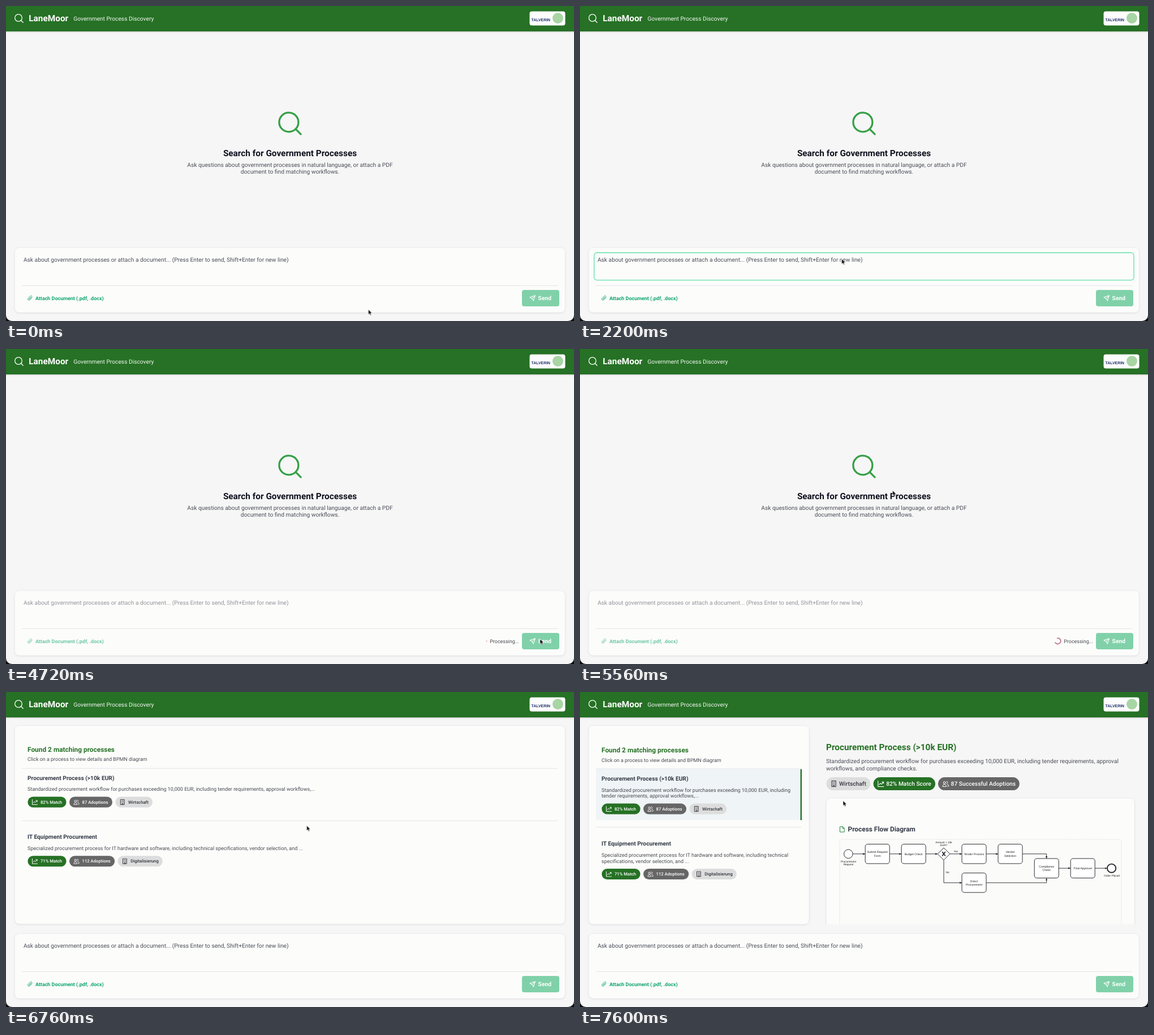
Animation, 1004 px wide and 558 px high, one loop 8000 ms. Source, as an HTML page:

```html
<!DOCTYPE html>
<html lang="en">
<head>
<meta charset="utf-8">
<title>Government Process Discovery</title>
<style>
  html, body { margin: 0; width: 100%; height: 100%; overflow: hidden; background: #f6f6f6; }
  svg.stage { display: block; width: 100vw; height: 100vh; }
  text { font-family: Roboto, "Open Sans", sans-serif; text-rendering: geometricPrecision; white-space: pre; }
  .h1 { font-size: 15.36px; font-weight: 700; }
  .h2 { font-size: 11.9px; font-weight: 700; }
  .h3 { font-size: 10.24px; font-weight: 700; fill: #343a46; }
  .body { font-size: 10.24px; fill: #4b4e58; }
  .small { font-size: 8.96px; fill: #484b52; }
  .desc { font-size: 9.02px; fill: #484b52; }
  .tag { font-size: 7.68px; font-weight: 500; }
  .tag.big { font-size: 10.24px; }
  .mid { text-anchor: middle; }
  .line { fill: none; stroke: currentColor; stroke-linecap: round; stroke-linejoin: round; }
  .card { fill: #fcfcfb; stroke: #e8e8ee; stroke-width: .7; filter: drop-shadow(0 1px 1.5px rgba(0, 0, 0, .08)); }
  .rule { stroke: #e3e4e8; stroke-width: 1; }
  .flow text { font: 5.1px "Liberation Sans", Arial, sans-serif; text-anchor: middle; fill: #1d1d22; }
  .flow text.note { font-size: 4.75px; }
  .flow .shape { fill: #fff; stroke: #22242a; stroke-width: .95; }
  .flow .edge { fill: none; stroke: #22242a; stroke-width: .9; marker-end: url(#tip); }
</style>
</head>
<body>
<svg class="stage" viewBox="0 0 1004 558" preserveAspectRatio="none">
  <defs>
    <marker id="tip" viewBox="0 0 10 10" refX="9.5" refY="5" markerWidth="4.6" markerHeight="4.6" orient="auto">
      <path d="M0 1L10 5L0 9Z" fill="#22242a"/>
    </marker>
    <clipPath id="pane"><rect x="415" y="45" width="589" height="366.5"/></clipPath>
    <linearGradient id="shade" x2="0" y2="1">
      <stop stop-opacity=".14"/><stop offset="1" stop-opacity="0"/>
    </linearGradient>
    <symbol id="chart" viewBox="0 0 12 12">
      <path class="line" d="M1 1V11H11.3M3 7.5L5.2 5L7.2 6.8L10.6 3M8.2 2.8H10.8V5.4" stroke-width="1.1"/>
    </symbol>
    <symbol id="people" viewBox="0 0 12 12">
      <path class="line" d="M.8 10.5C.8 5.8 7.2 5.8 7.2 10.5ZM8.6 6.6C10.4 6.6 11.3 8 11.3 10.3H9.3M7.6 1.9C10.5 1.2 10.5 5.6 7.9 5" stroke-width="1"/>
      <circle class="line" cx="4" cy="4" r="2" stroke-width="1"/>
    </symbol>
    <symbol id="building" viewBox="0 0 12 12">
      <path class="line" d="M2.4 .8H9.6V11.2H2.4ZM5 11V9H7V11M4.7 3H5M7 3H7.3M4.7 5H5M7 5H7.3M4.7 7H5M7 7H7.3" stroke-width="1.1"/>
    </symbol>
    <symbol id="plane" viewBox="0 0 12 12">
      <path class="line" d="M11.2 .8L7.6 11.2L5.2 6.8L.8 4.4ZM11.2 .8L5.2 6.8" stroke-width="1.1"/>
    </symbol>
  </defs>

  <rect width="1004" height="558" fill="#f6f6f6"/>

  <!-- header -->
  <rect y="45" width="1004" height="3" fill="url(#shade)"/>
  <rect width="1004" height="45" fill="#267125"/>
  <g color="#fff">
    <circle class="line" cx="22" cy="21" r="6.3" stroke-width="1.3"/>
    <path class="line" d="M26.5 25.5L30.2 29.2" stroke-width="1.3"/>
  </g>
  <text class="h1" x="40.3" y="27.3" fill="#fff">LaneMoor</text>
  <text class="body" x="119.3" y="25.5" style="fill:#f4f8f3">Government Process Discovery</text>
  <rect x="925.5" y="9.5" width="63" height="25" rx="4" fill="#fdfdfd"/>
  <text x="928.6" y="27" fill="#1c2c66" style="font:700 6.9px 'Liberation Sans',Arial,sans-serif">TALVERIN</text>
  <circle cx="975.5" cy="21.5" r="9.5" fill="#a8d5a4"/>

  <!-- empty state -->
  <g data-on="0-5840">
    <g color="#35a046">
      <circle class="line" cx="499.9" cy="205.9" r="17" stroke-width="3.3"/>
      <path class="line" d="M511.9 217.9L521.1 227.1" stroke-width="3.3"/>
    </g>
    <text class="h1 mid" x="502" y="266.4" fill="#10121f">Search for Government Processes</text>
    <text class="body mid" x="502" y="284.7">Ask questions about government processes in natural language, or attach a PDF</text>
    <text class="body mid" x="502" y="297">document to find matching workflows.</text>
  </g>

  <g id="wide" data-on="5840-7400"></g>
  <g id="split" data-on="7400-8000"></g>

  <!-- composer -->
  <rect class="card" x="15.4" y="428" width="972.8" height="115" rx="8"/>
  <rect data-on="2200-4640" x="25" y="437" width="954" height="48.6" rx="5" fill="#fcfcfb" stroke="#88e7bb" stroke-width="1.8"/>
  <text class="body" data-on="0-3480,4640-8000" data-dim x="30.9" y="452.7">Ask about government processes or attach a document... (Press Enter to send, Shift+Enter for new line)</text>
  <text class="body" data-on="3480-4640" x="30.7" y="452.7" style="fill:#3a3f48">How do I procure software licenses over 25,000 EUR for our department? Do I need a tender process?</text>
  <path data-on="2600-3120" d="M31 443.5V455" stroke="#222" stroke-width=".8"/>
  <path data-on="3480-4000" d="M489.8 443.5V455" stroke="#222" stroke-width=".8"/>
  <path class="rule" d="M28 495.3H976"/>
  <g data-dim color="#0fa56c">
    <path class="line" d="M46 516.5L42.2 520.3C39.6 522.6 37 519.8 39.2 517.5L43 513.7C44.7 512.2 46.8 514.3 45.2 516L41.7 519.4C40.8 520.2 39.8 519.2 40.6 518.4L43.6 515.4" stroke-width=".85"/>
    <text class="small" x="51.9" y="520.6" style="fill:#0fa56c;font-weight:700">Attach Document (.pdf, .docx)</text>
  </g>
  <rect x="912" y="503" width="66" height="29" rx="4" fill="#80d1a9"/>
  <rect data-on="3480-4640" x="912" y="503" width="66" height="29" rx="4" fill="#10ab6e"/>
  <use href="#plane" x="925.2" y="512" width="11" height="11" color="#fff"/>
  <text class="h3" x="940.6" y="521.2" style="fill:#fff">Send</text>
  <g data-on="4640-5840">
    <g transform="translate(844.5 517.4) scale(.26)">
      <g id="spin"><circle id="arc" r="20" fill="none" stroke-width="4.8" stroke-linecap="round"/></g>
    </g>
    <text class="small" x="855.2" y="520.6">Processing...</text>
  </g>

  <!-- window corners -->
  <path d="M0 547.5A10.5 10.5 0 0 0 10.5 558H0ZM1004 547.5A10.5 10.5 0 0 1 993.5 558H1004Z" fill="#0c0c0e"/>

  <g id="cursor" stroke="#fff" stroke-width=".7" stroke-linejoin="round">
    <path data-on="0-5840,6720-6880,7400-8000" fill="#0a0a0a" d="M0 0V9.2L2.1 7.3L3.5 10.4L5.1 9.7L3.8 6.7H6.6Z"/>
    <path data-on="5840-6720,6880-7400" fill="#fff" stroke="#1a1a1a" stroke-width=".9"
      d="M-.2 7V.9C-.2-.5 1.8-.5 1.8 .9V4.3C2.2 3.5 3.5 3.7 3.6 4.6C4.1 4 5.1 4.3 5.2 5.1C5.8 4.8 6.5 5.2 6.5 6V8.2C6.5 9.8 5.6 10 5.6 11.4H.8C.6 9.8-1.4 8.7-2.6 6.8C-3 5.8-1.9 5.3-1.2 5.9Z"/>
  </g>
</svg>
<script>
const LOOP = 8000, STEP = 40;
const GREEN = '#267125';
const $ = id => document.getElementById(id);

const text = (cls, x, y, s, fill) =>
  `<text class="${cls}" x="${x}" y="${y}"${fill ? ` style="fill:${fill}"` : ''}>${s}</text>`;

const TONES = {
  chart: [GREEN, '#fff'],
  people: ['#666666', '#fff'],
  building: ['#dddddd', '#33363d']
};

// rounded label with an icon; y is its middle
function pill(icon, x, w, y, s, big) {
  const [bg, fg] = TONES[icon];
  const h = big ? 23 : 19, size = big ? 12 : 10.6;
  return `<rect x="${x}" y="${y - h / 2}" width="${w}" height="${h}" rx="${h / 2}" fill="${bg}"/>
    <use href="#${icon}" x="${x + 7.2}" y="${y - size / 2}" width="${size}" height="${size}" color="${fg}"/>`
    + text(big ? 'tag big' : 'tag', x + 22.6, y + (big ? 3.7 : 2.7), s, fg);
}

// one result; y is the middle of its title
function item(y, p, lines) {
  const tags = y + 43 + (lines.length - 1) * 11;
  return text('h3', 38, y + 3.7, p.title)
    + lines.map((s, i) => text('desc', 38.1, y + 23.4 + i * 10.9, s)).join('')
    + pill('chart', 38.4, 68.2, tags, p.match + '% Match')
    + pill('people', 112, p.wide, tags, p.count + ' Adoptions')
    + pill('building', 117.4 + p.wide, p.deptWide, tags, p.dept);
}

const found = y => text('h2', 38, y + 4.2, 'Found 2 matching processes', GREEN)
  + text('small', 38.1, y + 20.6, 'Click on a process to view details and BPMN diagram');

const rule = (y, end) => `<path class="rule" d="M28 ${y}H${end}"/>`;

const buy = { title: 'Procurement Process (&gt;10k EUR)', match: 82, count: 87, wide: 76, dept: 'Wirtschaft', deptWide: 65.6 };
const gear = { title: 'IT Equipment Procurement', match: 71, count: 112, wide: 80.2, dept: 'Digitalisierung', deptWide: 79.2 };
const buyHead = 'Standardized procurement workflow for purchases exceeding 10,000 EUR, including';
const gearHead = 'Specialized procurement process for IT hardware and software, including technical';
const gearTail = 'specifications, vendor selection, and ...';

$('wide').innerHTML = `<rect class="card" x="15.4" y="59.5" width="972.8" height="351.5" rx="8"/>
  <rect data-on="6880-7400" x="28" y="136" width="947" height="79" fill="#f0f0f1"/>
  <rect data-on="5840-6720" x="28" y="241" width="947" height="79" fill="#f0f0f1"/>`
  + found(101.8) + rule(135.3, 975) + rule(228, 975)
  + item(152, buy, [buyHead + ' tender requirements, approval workflows,...'])
  + item(256.7, gear, [gearHead + ' ' + gearTail]);

// process diagram
const task = (x, y, ...lines) => `<rect class="shape" x="${x}" y="${y}" width="43" height="34.5" rx="4.2"/>`
  + lines.map((s, i) => text('', x + 21.5, y + 19 + (i - (lines.length - 1) / 2) * 6.1, s)).join('');
const edge = d => `<path class="edge" d="M${d}"/>`;
const note = (x, y, s) => text('note', x, y, s);

const flow = `<g class="flow">
  <circle class="shape" cx="474.3" cy="286.8" r="7.8"/>
  <circle class="shape" cx="939.6" cy="312.2" r="7.6" style="stroke-width:1.9"/>
  <path class="shape" d="M643 276L653.8 286.8L643 297.6L632.2 286.8Z"/>
  <path d="M640.2 283L645.8 290.6M645.8 283L640.2 290.6" stroke="#22242a" stroke-width="1.7"/>`
  + task(504.2, 269.5, 'Submit Request', 'Form') + task(568.2, 269.5, 'Budget Check')
  + task(675, 269.5, 'Tender Process') + task(739, 269.5, 'Vendor', 'Selection')
  + task(803.2, 295, 'Compliance', 'Check') + task(867.2, 295, 'Final Approval')
  + task(675, 320.6, 'Direct', 'Procurement')
  + ['482.1 286.8H504', '547.2 286.8H568', '611.2 286.8H632', '653.8 286.8H675', '718 286.8H739',
     '782 286.8H824.6V295', '643 297.6V337.9H675', '718 337.9H824.6V329.6',
     '846.2 312.2H867', '910.2 312.2H931.5'].map(edge).join('')
  + note(474.5, 302.1, 'Procurement') + note(474.5, 307.3, 'Request')
  + note(643, 267.8, 'Amount &gt; 10k') + note(643, 273.1, 'EUR?')
  + note(664.3, 283.6, 'Yes') + note(649.6, 321.2, 'No') + note(940, 326.8, 'Order Placed')
  + '</g>';

$('split').innerHTML = `<rect class="card" x="15.4" y="59.5" width="389.6" height="352" rx="8"/>
  <rect x="28" y="136.4" width="364" height="90.6" fill="#eff4f6"/>
  <rect x="389.6" y="136.4" width="2.4" height="90.6" fill="${GREEN}"/>`
  + found(102.9) + rule(136, 392) + rule(239.3, 392)
  + item(153.1, buy, [buyHead, 'tender requirements, approval workflows,...'])
  + item(268.5, gear, [gearHead, gearTail])
  + `<g clip-path="url(#pane)">`
  + text('h1', 435, 103, buy.title, GREEN)
  + text('body', 434.9, 126.4, buyHead + ' tender requirements, approval')
  + text('body', 435, 138.7, 'workflows, and compliance checks.')
  + pill('building', 435.4, 77.8, 162.6, 'Wirtschaft', true)
  + pill('chart', 518.6, 109.4, 162.6, '82% Match Score', true)
  + pill('people', 633, 143.8, 162.6, '87 Successful Adoptions', true)
  + `<rect class="card" x="435.2" y="188" width="545" height="260" rx="8"/>
  <path class="line" color="#1f8a3a" d="M459.8 238.6H464.4L467.2 241.4V248H459.8ZM464.2 238.8V241.6H467" stroke-width="1"/>`
  + text('h2', 473.5, 247.3, 'Process Flow Diagram', '#343a46')
  + `<g data-on="7480-8000">
    <rect x="459" y="261" width="498" height="180" rx="4" fill="#fbfbfa" stroke="#d9d9de" stroke-width=".8" stroke-dasharray="2 1.5"/>`
  + flow + '</g></g>';

// time, then x and y of the pointer's hot spot
const PATH = [
  [0, 640.5, 537.5], [1040, 640.5, 537.5], [1860, 462.5, 448], [3460, 462.5, 448],
  [3680, 984, 481.5], [4320, 946, 515], [4680, 946, 515], [5440, 552.5, 250.5],
  [6580, 552.5, 250.5], [7110, 465, 192.5], [LOOP, 465, 192.5]
];
const SEND = 4640, SPIN = 4720;

const anims = [
  $('cursor').animate(PATH.map(([at, x, y]) => ({
    offset: at / LOOP, transform: `translate(${x}px, ${y}px)`, easing: 'ease-in-out'
  })), { duration: LOOP, fill: 'both' }),
  $('spin').animate([{ transform: 'rotate(0deg)' }, { transform: 'rotate(360deg)' }],
    { duration: 2000, delay: SPIN, iterations: Infinity }),
  $('arc').animate([
    { strokeDasharray: '1, 200', strokeDashoffset: '0px', easing: 'ease-in-out' },
    { strokeDasharray: '89, 200', strokeDashoffset: '-35px', easing: 'ease-in-out' },
    { strokeDasharray: '89, 200', strokeDashoffset: '-124px' }
  ], { duration: 1500, delay: SPIN, iterations: Infinity, fill: 'both' }),
  $('arc').animate([
    { stroke: '#d62d20', easing: 'ease-in-out' }, { stroke: '#0057e7', offset: .4 }, { stroke: '#008744' }
  ], { duration: 6000, delay: SPIN, fill: 'both' })
];
anims.forEach(a => a.pause());

const shown = [...document.querySelectorAll('[data-on]')].map(el => ({
  el, spans: el.dataset.on.split(',').map(s => s.split('-').map(Number))
}));
const dimmed = document.querySelectorAll('[data-dim]');

function draw(t) {
  for (const { el, spans } of shown)
    el.style.display = spans.some(([a, b]) => t >= a && t < b) ? '' : 'none';
  for (const el of dimmed) el.style.opacity = t >= SEND && t < 5840 ? .6 : 1;
  for (const a of anims) a.currentTime = t;
}

const start = performance.now();
function tick() {
  const t = (performance.now() - start) % LOOP;
  draw(Math.floor(t / STEP) * STEP);
  requestAnimationFrame(tick);
}
tick();
</script>
</body>
</html>
```
